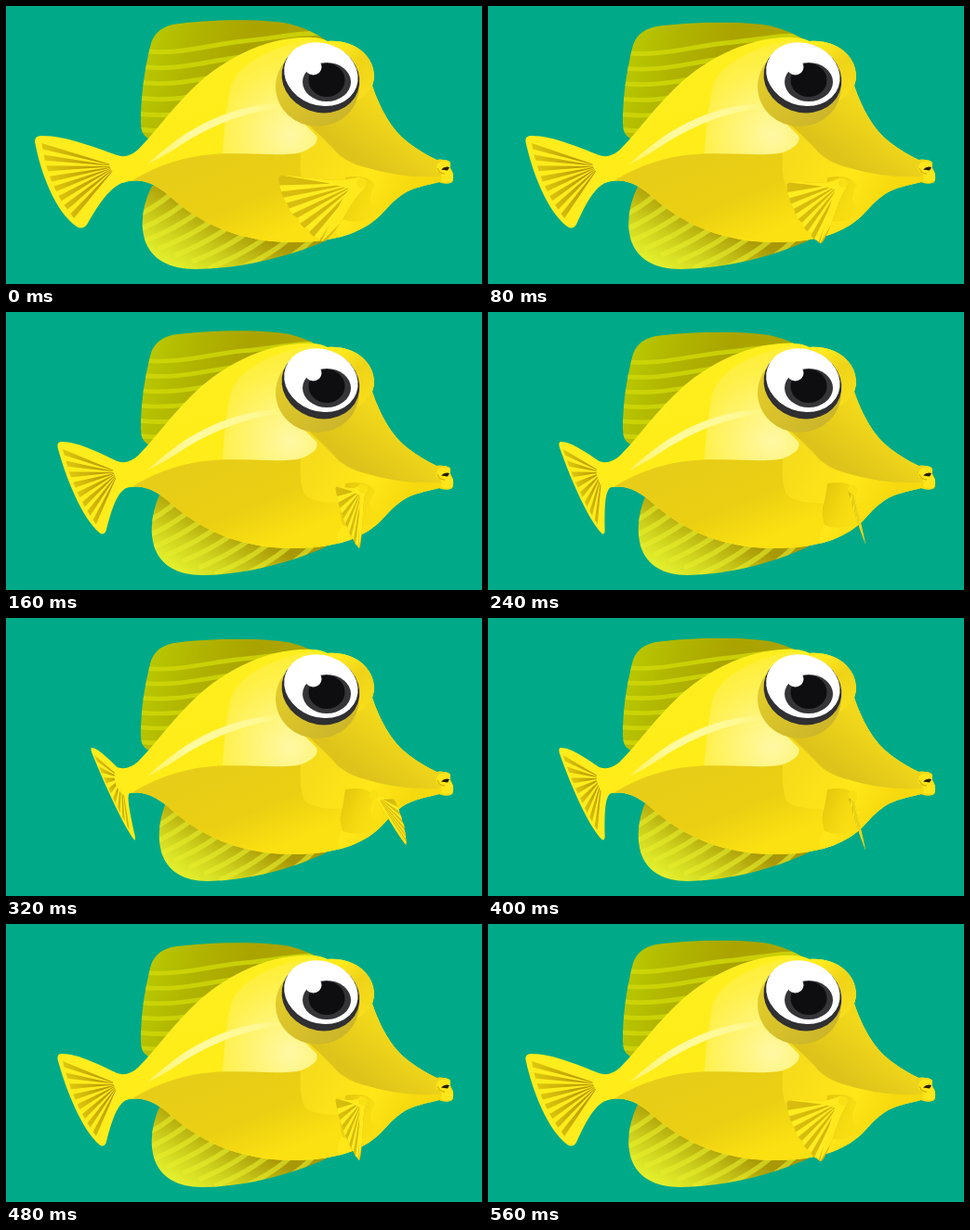
These frames come from a looping animation (512 px wide and 300 px high, 640 ms). An HTML page:

```html
<!DOCTYPE html>
<html lang="en">
<head>
<meta charset="utf-8">
<title>Yellow fish</title>
<style>
html, body { margin: 0; width: 100%; height: 100%; overflow: hidden; background: #00aa88; }
svg { display: block; width: 100vw; height: 100vh; }
</style>
</head>
<body>
<svg viewBox="0 0 512 300">
  <defs>
    <linearGradient id="dorsalFill" gradientUnits="userSpaceOnUse" x1="150" y1="50" x2="250" y2="75">
      <stop offset="0" stop-color="#b9c800"/><stop offset=".5" stop-color="#b0b400"/><stop offset="1" stop-color="#aba400"/>
    </linearGradient>
    <linearGradient id="analFill" gradientUnits="userSpaceOnUse" x1="190" y1="284" x2="225" y2="220">
      <stop offset="0" stop-color="#e2ee2c"/><stop offset=".4" stop-color="#ced21c"/><stop offset="1" stop-color="#a99806"/>
    </linearGradient>
    <linearGradient id="bodyFill" gradientUnits="userSpaceOnUse" x1="250" y1="40" x2="300" y2="255">
      <stop offset="0" stop-color="#ffef1e"/><stop offset="1" stop-color="#ffe912"/>
    </linearGradient>
    <linearGradient id="headFill" gradientUnits="userSpaceOnUse" x1="330" y1="160" x2="425" y2="215">
      <stop offset="0" stop-color="#f6dc1a"/><stop offset=".6" stop-color="#ffe718"/><stop offset="1" stop-color="#f6d90e"/>
    </linearGradient>
    <linearGradient id="snoutFill" gradientUnits="userSpaceOnUse" x1="410" y1="115" x2="375" y2="160">
      <stop offset="0" stop-color="#f2d81a"/><stop offset="1" stop-color="#dec41a"/>
    </linearGradient>
    <linearGradient id="bellyFill" gradientUnits="userSpaceOnUse" x1="235" y1="160" x2="275" y2="255">
      <stop offset="0" stop-color="#e8cd18"/><stop offset=".55" stop-color="#ebcf12"/><stop offset="1" stop-color="#fbe112"/>
    </linearGradient>
    <linearGradient id="gillFill" gradientUnits="userSpaceOnUse" x1="362" y1="200" x2="405" y2="220">
      <stop offset="0" stop-color="#e6c90c"/><stop offset="1" stop-color="#f8dd10" stop-opacity=".2"/>
    </linearGradient>
    <radialGradient id="glow" gradientUnits="userSpaceOnUse" cx="306" cy="139" r="100">
      <stop offset="0" stop-color="#fff8a4"/><stop offset=".4" stop-color="#fff474"/><stop offset=".75" stop-color="#fff04a"/><stop offset="1" stop-color="#ffee34"/>
    </radialGradient>
    <linearGradient id="streak" gradientUnits="userSpaceOnUse" x1="145" y1="175" x2="312" y2="105">
      <stop offset="0" stop-color="#fff25a"/><stop offset=".35" stop-color="#fffaa0"/><stop offset=".75" stop-color="#fff994"/><stop offset="1" stop-color="#fff572"/>
    </linearGradient>
    <linearGradient id="lidFill" gradientUnits="userSpaceOnUse" x1="360" y1="40" x2="394" y2="85">
      <stop offset="0" stop-color="#ffeb1e"/><stop offset=".5" stop-color="#eed318"/><stop offset="1" stop-color="#f6dc1a"/>
    </linearGradient>
    <linearGradient id="socket" gradientUnits="userSpaceOnUse" x1="295" y1="75" x2="350" y2="132">
      <stop offset="0" stop-color="#e2cc2a"/><stop offset="1" stop-color="#cdb62a"/>
    </linearGradient>
    <linearGradient id="tailRay" gradientUnits="userSpaceOnUse" x1="112" y1="172" x2="45" y2="188">
      <stop offset="0" stop-color="#b08f04"/><stop offset="1" stop-color="#e0c90e"/>
    </linearGradient>
    <linearGradient id="finFill" gradientUnits="userSpaceOnUse" x1="374" y1="193" x2="305" y2="222">
      <stop offset="0" stop-color="#d2b008"/><stop offset="1" stop-color="#d9bf10"/>
    </linearGradient>
    <clipPath id="dorsalClip"><path d="M153 143Q145 139 145 126C145 96 149 70 155 44Q159 25 179 20C212 15 270 13 304 19Q328 25 347 39L290 110Z"/></clipPath>
    <clipPath id="analClip"><path d="M157 194Q145 219 147 240C149 267 168 284 204 284C260 283 310 268 345 253L250 190Z"/></clipPath>
    <clipPath id="bodyClip"><path id="bodyShape" d="M119 161Q131 165 142 155C160 137 176 113 204 86C239 53 286 32 330 34Q338 34 346 38C373 36 397 53 396 77Q395 83 394 86C402 110 414 133 432 147Q448 159 463 166Q474 165 478 169L478 175Q483 183 480 190Q474 193 466 190C450 194 438 196 427 203C412 213 408 222 398 230C378 247 348 255 308 255C255 255 212 237 178 207C162 193 147 184 126 191Q112 178 119 161Z"/></clipPath>
    <clipPath id="finClip"><path d="M293 186Q294 182 302 183C323 184 350 191 372 186Q385 183 388 190Q388 196 379 204C366 220 359 240 344 253Q340 256 335 250Q328 249 325 241Q316 238 314 229Q304 224 303 214Q296 207 293 186Z"/></clipPath>
  </defs>

  <rect x="-600" y="-600" width="1800" height="1500" fill="#00aa88"/>

  <g id="dorsal" clip-path="url(#dorsalClip)">
    <rect x="140" y="10" width="220" height="140" fill="url(#dorsalFill)"/>
    <g id="dorsalRays" fill="none" stroke="#cfd808" stroke-width="5" opacity=".85"/>
  </g>

  <g id="anal" clip-path="url(#analClip)">
    <rect x="140" y="185" width="215" height="102" fill="url(#analFill)"/>
    <g id="analRays" fill="none" stroke="#e8ee2c" stroke-width="5.500" opacity=".6"/>
  </g>

  <g id="tail">
    <path d="M31 146Q31 140 38 140C66 140 96 153 128 164L140 188C118 188 106 203 87 236Q82 242 76 238C53 222 37 180 31 146Z" fill="#ffec1c"/>
    <g id="tailRays" fill="url(#tailRay)"/>
  </g>

  <use href="#bodyShape" fill="url(#bodyFill)"/>
  <g clip-path="url(#bodyClip)">
    <path d="M330 36C280 44 246 66 241 90Q238 106 236 122L232 165H345L380 90Z" fill="url(#glow)"/>
    <path d="M130 192Q168 167 212 161C255 156 290 164 318 158L420 160L430 270L180 270Z" fill="url(#bellyFill)"/>
    <path d="M320 126L400 100L490 165L490 195L420 240L380 250Q345 258 362 228Q358 215 360 206Q329 206 321 197Q315 183 317 158Q338 150 334 140Z" fill="url(#headFill)"/>
    <path d="M318 122Q338 139 352 154Q363 168 386 174Q425 186 466 184L485 160L400 70Z" fill="url(#snoutFill)"/>
    <path d="M365 185Q391 181 397 194Q388 207 395 216L406 222Q382 238 362 230Q357 214 362 204Z" fill="url(#gillFill)"/>
    <path d="M152 171C184 141 225 112 282 106Q300 104 308 109C265 111 228 126 194 146Q174 160 152 171Z" fill="url(#streak)"/>
  </g>

  <path d="M345 38C373 35 396 52 396 77Q394 94 374 104L360 56Z" fill="url(#lidFill)"/>
  <ellipse cx="335" cy="87" rx="45" ry="43" fill="url(#socket)"/>
  <g transform="rotate(20 338 76)">
    <ellipse cx="339" cy="77.500" rx="42.500" ry="37" fill="#302f31"/>
    <ellipse cx="338" cy="73.500" rx="40.500" ry="33.500" fill="#fff"/>
  </g>
  <ellipse cx="345" cy="82" rx="26" ry="21" fill="#353437"/>
  <ellipse cx="345" cy="80" rx="19.500" ry="18" fill="#0e0e10"/>
  <ellipse cx="330.500" cy="66" rx="9" ry="8.500" fill="#fff"/>

  <path d="M463 174Q464 166 475 168Q479 170 477 174Q471 173 468 177Q474 178 478 176Q483 182 480 189Q473 192 468 188Q471 181 463 178Z" fill="#ffe61a"/>
  <path d="M464 175Q466 181 472 181" fill="none" stroke="#d9b600" stroke-width="1.300"/>
  <path d="M468 176.500Q472 172.500 477 174L475 177.500Z" fill="#241d00"/>

  <g id="fin">
    <g clip-path="url(#finClip)">
      <rect x="290" y="180" width="100" height="78" fill="url(#finFill)"/>
      <g id="finRays" fill="#ffec20"/>
      <path d="M293 182L350 184L392 182V200L362 232L338 256L360 212L369 197L345 191Z" fill="#ffe91c"/>
    </g>
  </g>
  <ellipse id="knob" rx="5" ry="5" fill="#f8e014"/>
</svg>
<script>
const byId = id => document.getElementById(id);
const mix = (a, b, t) => a + (b - a) * t;

function addPaths(id, n, shape) {
  let out = '';
  for (let i = 0; i < n; i++) out += `<path d="${shape(i)}"/>`;
  byId(id).innerHTML = out;
}

// Wedges from a root to a curved rim
function fan(id, n, root, a, ctrl, b, fill) {
  const rim = t => [0, 1].map(k =>
    mix(mix(a[k], ctrl[k], t), mix(ctrl[k], b[k], t), t));
  addPaths(id, n, i => {
    const p = rim((i + .5 - fill / 2) / n), q = rim((i + .5 + fill / 2) / n);
    const near = pt => [mix(root[0], pt[0], .1), mix(root[1], pt[1], .1)];
    return `M${near(p)}L${p}L${q}L${near(q)}Z`;
  });
}

addPaths('dorsalRays', 6, i => {
  const y = 48 + i * 17;
  return `M140 ${y}C185 ${y + 6} 215 ${y - 6} 255 ${y - 10}S315 ${y - 20} 345 ${y - 18}`;
});
addPaths('analRays', 11, i => {
  const x = 175 + i * 18, y = 196 + i * 7;
  return `M${x + 10} ${y}Q${x - 15} ${y + 25} ${x - 65} ${y + 45}`;
});
fan('tailRays', 8, [119, 173], [38, 145], [44, 196], [75, 231], .52);
fan('finRays', 6, [379, 191], [290, 190], [300, 233], [338, 258], .5);

// Affine matrix taking the triangle p, a, b to p2, a2, b2
function warp([p, a, b], [p2, a2, b2]) {
  const ux = a[0] - p[0], uy = a[1] - p[1], vx = b[0] - p[0], vy = b[1] - p[1];
  const det = ux * vy - uy * vx;
  const [r, s] = [0, 1].map(k => {
    const u = a2[k] - p2[k], v = b2[k] - p2[k];
    const mx = (u * vy - v * uy) / det, my = (v * ux - u * vx) / det;
    return [mx, my, p2[k] - mx * p[0] - my * p[1]];
  });
  return `matrix(${r[0]} ${s[0]} ${r[1]} ${s[1]} ${r[2]} ${s[2]})`;
}

const tail = [[128, 178], [32, 141], [79, 239]];
const tailShift = [0, 9, 23.5, 44, 59];
const analShift = [0, 4.5, 10, 15, 18];
const dorsalDrop = [0, 2.5, 4.8, 6.5, 7.5];
const finPoses = [
  [[382, 190], [293, 183], [341, 254]],
  [[382, 190], [321, 191], [358, 256]],
  [[384, 190], [354, 189], [380, 255]],
  [[392, 190], [387, 193], [406, 250]],
  [[396, 190], [418, 196], [430, 245]]
];

function draw(ms) {
  const step = Math.floor(ms % 640 / 80);
  const k = step > 4 ? 8 - step : step;
  const set = (id, m) => byId(id).setAttribute('transform', m);
  const [root, top, low] = tail, d = tailShift[k];
  set('tail', warp(tail, [root, [top[0] + d, top[1]], [low[0] + d, low[1]]]));
  const sx = 1 - analShift[k] / 198;
  set('anal', `translate(${345 * (1 - sx)} 0) scale(${sx} 1)`);
  const sy = 1 - dorsalDrop[k] / 124;
  set('dorsal', `translate(0 ${140 * (1 - sy)}) scale(1 ${sy})`);
  set('fin', warp(finPoses[0], finPoses[k]));
  const [x, y] = finPoses[k][0];
  set('knob', `translate(${x} ${y + 1})`);
}

const start = performance.now();
function tick() {
  draw(performance.now() - start);
  requestAnimationFrame(tick);
}
draw(0);
requestAnimationFrame(tick);
</script>
</body>
</html>
```
